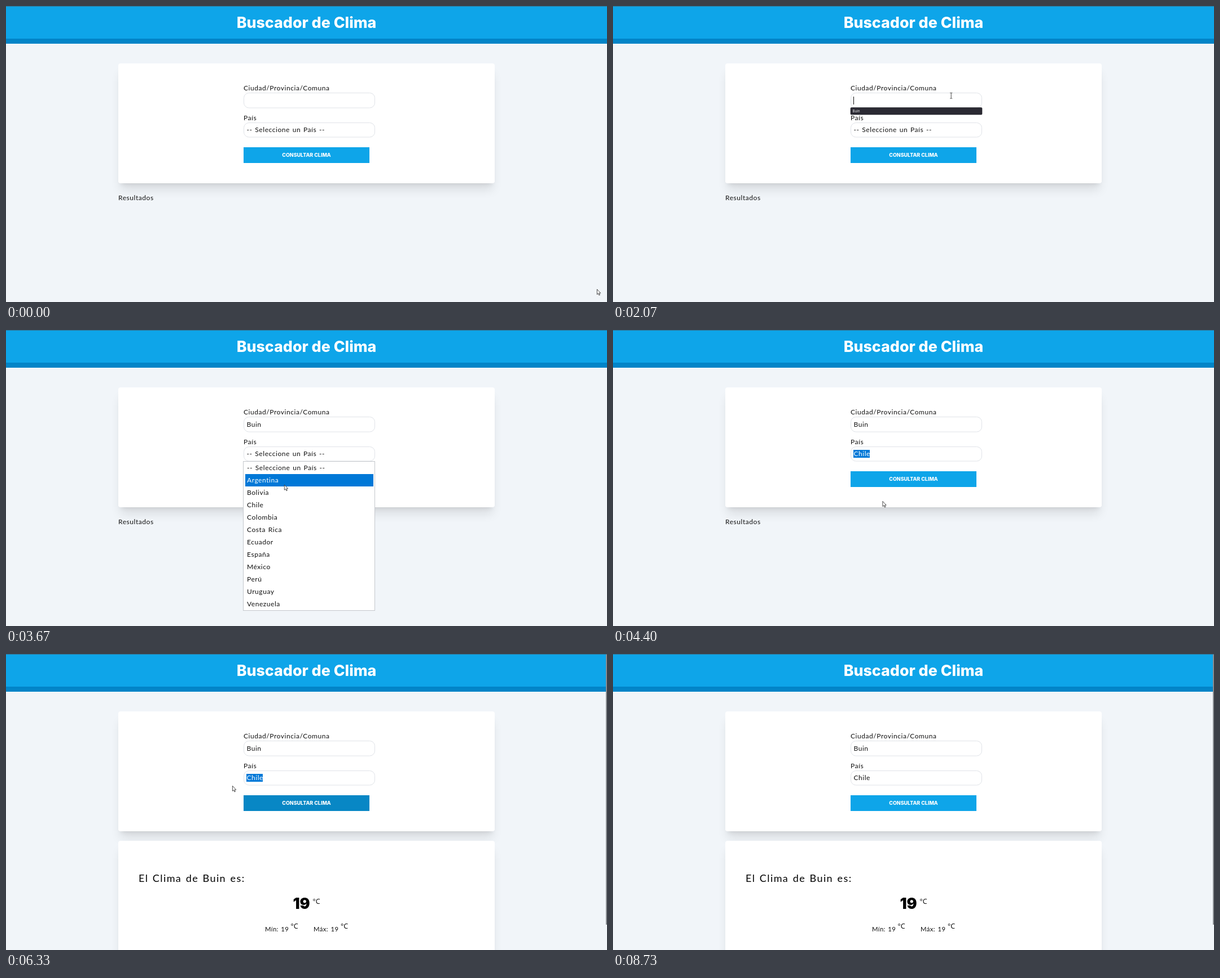
Write an HTML page that moves like this. It is 1065 by 526 pixels and loops after 9340 ms.

```html
<!DOCTYPE html>
<html lang="es">
<head>
<meta charset="utf-8">
<title>Buscador de Clima</title>
<style>
html, body { margin: 0; width: 100%; height: 100%; overflow: hidden; background: #f1f5f9; }
#stage { position: relative; width: 1065px; height: 526px; overflow: hidden; background: #f1f5f9; }
.card {
  position: absolute; left: 199px; width: 667px; background: #fff; border-radius: 4px;
  box-shadow: 0 15px 18.6px -3.7px rgba(0,0,0,.1), 0 6px 7.4px -4.5px rgba(0,0,0,.1);
}
#form { top: 102px; height: 213px; }
#resultCard { top: 332px; height: 240px; }
svg { position: absolute; left: 0; top: 0; }
text { font: 12px Lato, sans-serif; letter-spacing: .55px; word-spacing: 1.2px; fill: #111; white-space: pre; }
.title, .big, .btn { font-family: Inter, sans-serif; font-weight: 800; letter-spacing: 0; word-spacing: 0; }
.title { font-size: 26.8px; fill: #fff; text-anchor: middle; }
.btn { font-size: 8.93px; fill: #fff; text-anchor: middle; }
.big { font-size: 26.8px; font-weight: 900; fill: #000; }
.head { font-size: 18px; letter-spacing: 1.4px; word-spacing: 1.5px; fill: #000; }
.temp { font-size: 11.3px; letter-spacing: .4px; }
.unit { font: 12.5px "Open Sans", sans-serif; letter-spacing: 0; fill: #000; }
.hint { font: 6.2px "Open Sans", sans-serif; letter-spacing: 0; fill: #fbfbfe; }
.field { fill: #fff; stroke: #e0e3e8; }
</style>
</head>
<body>
<div id="stage">
  <div class="card" id="form"></div>
  <div class="card" id="resultCard"></div>
  <svg width="1065" height="526" viewBox="0 0 1065 526">
    <rect width="1065" height="58" fill="#0ea5e9"/>
    <rect y="58" width="1065" height="9" fill="#0284c7"/>
    <rect width="1065" height="1" fill="#34718f"/>
    <text class="title" x="532.5" y="39">Buscador de Clima</text>

    <text x="421" y="150">Ciudad/Provincia/Comuna</text>
    <rect class="field" x="421.5" y="154.5" width="232" height="26.5" rx="9"/>
    <text id="city" x="426.5" y="172">Buin</text>
    <rect id="caret" y="161" width="1" height="14" fill="#111"/>

    <text x="421" y="203">País</text>
    <rect class="field" x="421.5" y="207.5" width="232" height="25.5" rx="9"/>
    <rect id="mark" x="426" y="213" width="29" height="14" fill="#0078d7"/>
    <text id="country" x="426.5" y="224"></text>

    <rect id="button" x="421" y="251" width="223" height="28"/>
    <text class="btn" x="532.5" y="268.3">CONSULTAR CLIMA</text>

    <text id="idle" x="199" y="345">Resultados</text>
    <g id="result">
      <text class="head" x="235" y="404.5">El Clima de Buin es:</text>
      <text class="big" x="508.5" y="453">19</text>
      <text class="unit" x="543.5" y="444">°C</text>
      <text class="temp" x="459" y="493">Mín: 19</text>
      <text class="unit" x="504.5" y="488">°C</text>
      <text class="temp" x="545" y="493">Máx: 19</text>
      <text class="unit" x="593" y="488">°C</text>
      <rect x="1063" y="1" width="2" height="480" fill="#868a8f"/>
    </g>

    <g id="hint">
      <rect id="hintBox" x="421" y="180.5" width="233" height="12.5" rx="1.5" stroke="#1c1b22" stroke-width=".6"/>
      <text class="hint" x="424.5" y="189.3">Buin</text>
    </g>
    <g id="popup"></g>

    <g id="arrow">
      <path d="M.4 .4V9.6L2.5 7.7L3.9 11L5.4 10.4L4 7.2H6.7Z" fill="#fff" stroke="#222" stroke-width=".8"/>
    </g>
    <path id="beam" d="M-2-5H-.5L0-4.5L.5-5H2M0-4.5V4.5M-2 5H-.5L0 4.5L.5 5H2" fill="none" stroke="#333" stroke-width=".9"/>
  </svg>
</div>
<script>
const LOOP = 9340, STEP = 200 / 3;
const $ = id => document.getElementById(id);
const show = (id, on) => { $(id).style.display = on ? '' : 'none'; };
const within = (t, a, b) => t >= a && t < b;

// pointer stops: time, x, y
const path = [
  [70, 1047, 503], [930, 604, 168], [1070, 603, 168], [1500, 600, 158.5],
  [2030, 600, 158.5], [2400, 572, 186], [2530, 568, 186], [3000, 518, 215],
  [3130, 512.5, 224], [3400, 512.5, 224], [3870, 480, 308], [4340, 480, 308],
  [4400, 477.5, 304], [4930, 458, 261], [5600, 457, 261], [6000, 446, 256],
  [6330, 401, 234], [6600, 398, 234], [6730, 398, 234], [7000, 352, 231],
  [7270, 362, 234], [7530, 362, 234], [8530, 45, 503], [8720, 39, 527]
];

function pointer(t) {
  if (t <= path[0][0]) return path[0].slice(1);
  for (let i = 1; i < path.length; i++) {
    const [t0, x0, y0] = path[i - 1], [t1, x1, y1] = path[i];
    if (t <= t1) {
      const k = (t - t0) / (t1 - t0), e = k * k * (3 - 2 * k);
      return [x0 + (x1 - x0) * e, y0 + (y1 - y0) * e];
    }
  }
  return null;
}

const ROW = 22, TOP = 234, PROMPT = '-- Seleccione un País --';
const options = [PROMPT, 'Argentina', 'Bolivia', 'Chile', 'Colombia', 'Costa Rica',
  'Ecuador', 'España', 'México', 'Perú', 'Uruguay', 'Venezuela'];
$('popup').innerHTML =
  `<rect x="420.5" y="${TOP - .5}" width="233" height="${ROW * options.length + 1}" fill="#fff" stroke="#c4c7cc"/>` +
  options.map((o, i) => `<rect class="row" x="424" y="${TOP + i * ROW}" width="227" height="${ROW}" fill="#0078d7"/>` +
    `<text class="opt" x="427" y="${TOP + i * ROW + 15}">${o}</text>`).join('');
const rows = document.querySelectorAll('.row'), opts = document.querySelectorAll('.opt');

// button colour: 0 rest, 1 hovered
const clamp = v => Math.max(0, Math.min(1, v));
const hover = t => clamp((t - 4600) / 150) - clamp((t - 6260) / 150);
const mix = k => [[14, 3], [165, 105], [233, 161]].map(([a, b]) => Math.round(a + (b - a) * k));

function draw(now) {
  const t = Math.floor((now % LOOP + 4) / STEP) * STEP + 1;
  const p = pointer(t);

  show('hint', within(t, 1200, 2520));
  $('hintBox').setAttribute('fill', within(t, 2320, 2520) ? '#52525e' : '#2b2a33');
  show('city', t >= 2520);
  show('caret', within(t, 930, 1530) || within(t, 2060, 3060));
  $('caret').setAttribute('x', t < 2520 ? 426 : 452);

  const open = within(t, 3195, 4060), marked = within(t, 4395, 6595);
  $('country').textContent = t < 4060 ? PROMPT : 'Chile';
  $('country').style.fill = marked ? '#fff' : '#111';
  show('mark', marked);
  show('popup', open);
  if (open) {
    const sel = Math.max(0, Math.floor((p[1] - TOP) / ROW));
    rows.forEach((r, i) => { r.style.display = i === sel ? '' : 'none'; });
    opts.forEach((o, i) => { o.style.fill = i === sel ? '#fff' : '#111'; });
  }

  $('button').setAttribute('fill', `rgb(${mix(hover(t))})`);
  show('idle', t < 5125);
  show('result', t >= 5590);
  show('resultCard', t >= 5590);

  const text = within(t, 860, 2260);
  show('beam', p && text);
  show('arrow', p && !text);
  if (p) $(text ? 'beam' : 'arrow').setAttribute('transform', `translate(${p[0].toFixed(1)} ${p[1].toFixed(1)})`);
}

const start = performance.now();
function tick() {
  draw(performance.now() - start);
  requestAnimationFrame(tick);
}
tick();
</script>
</body>
</html>
```
